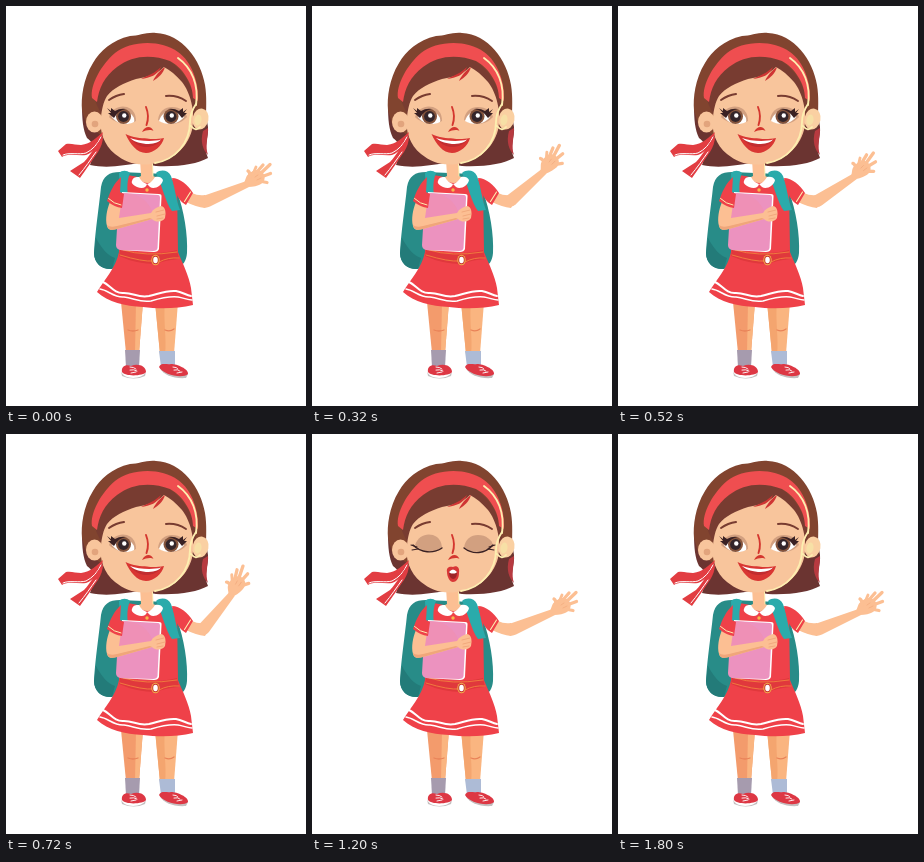
These frames come from a looping animation (300 by 400 pixels, 2000 ms). An HTML page with a canvas:

```html
<!DOCTYPE html>
<html lang="en">
<head>
<meta charset="utf-8">
<title>Waving girl</title>
<style>
html, body { margin: 0; width: 100%; height: 100%; overflow: hidden; background: #fff; }
canvas { display: block; width: 100vw; height: 100vh; }
</style>
</head>
<body>
<canvas id="stage"></canvas>
<script>
const W = 300, H = 400, LOOP = 2000, STEP = 40;
const canvas = document.getElementById('stage');
const ctx = canvas.getContext('2d');

const SKIN = '#f8c59c', LIMB = '#fcbf93', SHADE = '#f0a67a', RED = '#ef4149', DEEP = '#d93633';
const CROWN = '#81442f', HAIR = '#783c31', HAIR_DARK = '#6b3431';
const TEAL = '#2aabab', TEAL_DARK = '#288c88';
const CREAM = '#fdeeb0', WHITE = '#fff', INK = '#3a2123';

function fill(color, d) {
  ctx.fillStyle = color;
  ctx.fill(new Path2D(d));
}

function line(color, width, d) {
  ctx.strokeStyle = color;
  ctx.lineWidth = width;
  ctx.stroke(new Path2D(d));
}

function oval(color, x, y, rx, ry = rx, turn = 0) {
  ctx.fillStyle = color;
  ctx.beginPath();
  ctx.ellipse(x, y, rx, ry, turn, 0, Math.PI * 2);
  ctx.fill();
}

function backpack() {
  fill(TEAL_DARK, 'M114 166C103 166 97 170 95 181C93 201 89 226 88 247C88 258 97 264 106 263L122 256L164 256C172 264 180 260 181 247C182 229 178 204 171 186L160 168Z');
  fill('#237b79', 'M90 232C96 243 101 249 109 252L106 263C97 264 88 258 88 247Z');
}

function legs() {
  fill('#f39b6c', 'M115 296L120 347L133 347L137 296Z');
  fill('#fab580', 'M130 296L137 296L133 347L129 347Z');
  fill('#fab580', 'M149 296L154 348L168 348L172 296Z');
  fill('#f4a56f', 'M149 296L159 296C157 314 161 334 159 348L154 348Z');
  line('#e98358', 1.3, 'M122 324Q127 326 132 324M159 324Q164 326 168 323');
  fill('#a69bae', 'M119 344L134 344L133 361L120 361Z');
  fill('#adbbd6', 'M153 345L169 345L169 361L155 361Z');
  fill('#c4bfc0', 'M115 365C117 374 136 374 140 366L139 370Q128 375 116 370Z');
  fill('#dd3744', 'M116 366C115 360 120 358 125 360C132 357 140 360 140 366C138 370 119 371 116 366Z');
  fill('#c4bfc0', 'M154 362C157 369 168 373 180 372L182 368L155 360Z');
  fill('#dd3744', 'M153 361C155 356 161 359 165 358C171 358 183 363 182 368C177 373 157 369 153 361Z');
  line(WHITE, 0.9, 'M124 361Q128 361 130 363M124 364Q128 363 131 365M125 367L130 366M167 361Q171 361 172 363M168 364Q172 363 174 365M171 367L176 366');
}

function dress() {
  fill(RED, 'M116 170C121 168 128 170 132 171L151 171C158 169 168 170 171 180L172 246C176 256 183 270 185 282L187 299C171 303 152 303 137 301C119 300 102 296 91 286C98 274 110 262 113 246Z');
  line(WHITE, 2, 'M97 276C104 279 108 288 118 287C128 287 132 292 143 290C152 288 160 284 170 285C176 286 180 289 185 290');
  line(WHITE, 1.5, 'M94 283C102 284 108 292 118 291C128 292 134 297 145 295C155 292 163 290 172 291C178 292 182 294 186 294');
  fill('#e0383c', 'M114 243Q140 251 171 244L173 253Q160 254 150 258Q130 258 113 250Z');
  line('#f2803f', 0.9, 'M117 244Q139 251 171 246M114 249Q137 256 147 255M153 256Q162 251 173 252');
  oval('#f1b14d', 149.5, 254, 4.2, 5.3);
  oval('#c9312e', 149.5, 254, 3.2, 4.2);
  oval(WHITE, 149.5, 254, 2.3, 3.2);
}

function strapsAndSleeves() {
  fill(TEAL, 'M113 167C116 164 121 164 124 167C121 174 121 182 122 190L114 190Z');
  fill(TEAL, 'M150 167C155 163 162 164 165 170C169 181 170 194 174 204L166 205C160 198 156 179 150 167Z');
  fill(RED, 'M166 172C174 172 182 179 187 187L180 199C175 196 171 191 170 186Z');
  line(CREAM, 1.1, 'M184.500 186L178.500 195.500');
}

function chest() {
  fill(LIMB, 'M134 153L147 153L147 170L152 172Q142 182 131 172L135 170Z');
  line(CREAM, 1, 'M146.500 158L147 170');
  fill(WHITE, 'M126 175C127 171 130 171 133 171C135 175 138 177 141 178C140 182 136 183 131 181C127 179 125 177 126 175Z');
  fill(WHITE, 'M141 178C145 177 147 174 149 171C152 170 156 171 157 174C156 180 148 184 144 181Z');
  oval('#f6b84d', 141, 184, 1.7);
}

function book() {
  fill(WHITE, 'M116 186L153 188Q156 188 155.500 191L153 243Q152 246 148 246L114 244Z');
  fill('#ec92bf', 'M113 189Q113 187 116 187L152 189Q154 189 154 192L151.500 242Q151 245 147 245L114 244Q110 243 110 239Z');
  fill('#ef90b6', 'M113 189Q113 187 116 187L127 188C138 191 145 199 148 211L112 214Z');
}

function nearArm() {
  fill(LIMB, 'M104 196C101 203 99 213 101 220C102 225 107 224 111 223L146 213C150 217 157 216 159 212C160 207 160 201 155 200C151 201 147 203 145 207L113 212L115 198Z');
  fill(SHADE, 'M101 219C102 225 107 224 111 223L146 213L144 212L111 220Q104 222 101 219Z');
  line(SHADE, 0.9, 'M150 206L158 204M151 210L159 208M151 213L157 212');
  fill(RED, 'M115 171C108 177 104 186 101 195Q108 201 116 202L118 188L114 186Z');
  line(CREAM, 1, 'M102.500 192.500Q108 198 115 199');
}

function wavingArm(turn) {
  fill(LIMB, 'M186 187Q192 190 199 189L203 195L199 202Q190 201 180 196Z');
  ctx.save();
  ctx.translate(197, 200);
  ctx.rotate(turn * Math.PI / 180);
  ctx.translate(-197, -200);
  fill(LIMB, 'M197 190L239 175.500L243 181L204 200.500Q199 203 195 200Z');
  fill(LIMB, 'M238 177C240 173 240 169 243 168C247 164 253 162 257 167C260 171 259 177 253 179C248 181 243 181 240 181Z');
  line(LIMB, 3.3, 'M244 171Q244 166 242 165M250 167L257 159M254 168L264 158.500M255 171L264.500 167.500M253 175L261 176.500');
  line(LIMB, 2.9, 'M247 168L250 161');
  line(SHADE, 0.6, 'M249 171L252 169M251 174L255 172');
  ctx.restore();
}

function hair() {
  fill(HAIR_DARK, 'M76 100C76 113 77 124 81 132C90 138 88 148 84 159C102 163 119 159 133 157L150 160C173 161 191 158 202 152C197 141 203 131 202 121L196 83Z');
  fill('#b73a40', 'M197 125L202 122C202 132 199 140 202 149C197 144 194 136 197 125Z');
  fill(CROWN, 'M150 27C140 26 133 30 124 30C106 34 94 45 87 57C77 73 75 92 76 104L80 118L96 130L102 95L187 95L190 122L200 116C200 102 201 91 199 79C195 54 176 28 150 27Z');
  fill(HAIR, 'M90 97C91 73 112 48 140 48C166 48 188 72 190 104L187 118L100 118Z');
  fill('#ef4e50', 'M86 92C84 79 95 59 109 47C124 35 154 33 172 46C186 56 193 76 192 95L187 92C187 78 177 62 164 55C146 48 126 49 111 61C98 71 93 82 91 96Z');
  line(CREAM, 1.9, 'M172 52C186 62 193 79 190 99');
}

function ears() {
  oval(SKIN, 88.500, 116, 8.5, 10.5);
  oval('#e2a47d', 89, 118, 3.3);
  oval('#fad0a2', 194.500, 113, 8, 10.5, 0.2);
  oval('#f7e0a6', 192, 114, 3.5, 5.5, 0.2);
}

function head() {
  fill(SKIN, 'M158 61C150 69 140 71 130 73C118 77 107 82 101 90C97 97 96 103 95 111C93 125 98 139 109 148C119 156 130 160 144 158C165 156 181 143 186 124C190 106 184 86 176 76C170 69 164 64 158 61Z');
  line(CREAM, 1.9, 'M190 98C186 104 184 110 184 116C184 137 169 154 149 157M185 120Q190 126 194 121');
  fill('#cf3534', 'M155 61C149 67 143 69 135 73C144 72 152 69 155 61Z');
  fill('#cf3534', 'M159 61C154 64 149 70 147 75C152 72 157 68 159 61Z');
  line(HAIR, 2, 'M103 94Q110 89 118 88M160 90Q171 89 180 95');
}

function bow() {
  fill('#e23d42', 'M97 126C91 131 85 138 75 139C70 139 65 137 60 138L52 145L56 151C62 147 72 150 80 149C88 146 95 138 97 126Z');
  line(WHITE, 1, 'M57 149C63 146 73 149 80 147Q90 142 95 131');
  fill('#e23d42', 'M97 130C90 138 85 149 78 156L64 165L74 172C80 164 87 153 92 146C95 141 97 136 97 130Z');
  line(WHITE, 1, 'M73 169C79 162 85 153 90 146');
}

function nose() {
  line('#d4372f', 1.9, 'M140 101C142 106 143 112 140.500 119');
  fill('#d4372f', 'M136 126C139 120 145 119 147.500 125C145 123 140 124 136 126Z');
}

function lids() {
  fill('#d2a080', 'M103 111C106 102 114 99 121 101C127 103 130 108 130 115C120 120 109 117 103 111Z');
  fill('#d2a080', 'M152 114C153 105 159 101 166 101C174 101 180 106 181 111C174 119 162 120 152 114Z');
}

function eyes(closed) {
  lids();
  if (closed) {
    line(INK, 1.4, 'M101 111C109 119 121 120 130 114M152 114C161 121 173 120 181 111');
    line(INK, 1.1, 'M99 111L105 113M100 116L106 115M183 111L177 113M182 116L176 115');
    return;
  }
  fill(WHITE, 'M106 111C110 105 117 104 122 106C127 109 129 112 128 116C120 120 111 118 106 111Z');
  fill(WHITE, 'M153 115C155 108 161 104 167 105C173 106 177 109 178 111C172 119 161 120 153 115Z');
  for (const x of [117.5, 165]) {
    oval('#85543c', x, 110.5, 7.5);
    oval('#33252a', x, 110.5, 5.4);
    oval(WHITE, x + 0.8, 109.5, 2.2);
  }
  fill(INK, 'M101 102L105 105L105 102L109 105Q114 102 120 103Q112 104 108 112L102 107L105 107Z');
  fill(INK, 'M181 103L177 106L177 102L173 105Q168 102 162 103Q171 104 176 112L181 107L178 107Z');
}

function mouth(round) {
  if (round) {
    fill('#d83737', 'M135 138C134 133 138 132 141 133C145 131 148 134 147 139C147 145 144 148 141 148C138 148 135 143 135 138Z');
    fill('#9d2529', 'M137 138Q141 133 145 138Q145 145 141 145Q137 144 137 138Z');
    fill(WHITE, 'M137 138Q141 133 145 138L144 139Q141 140 138 139Z');
    return;
  }
  fill(DEEP, 'M119.500 128C127 132 135 132 141 132.500C147 133.500 152 133 158 132C156 140 148 147 140 147C131 147 124 138 119.500 128Z');
  fill('#c22d30', 'M125 133C133 136 147 136 155 134C150 140 145 141 139 141C132 140 128 137 125 133Z');
  fill(WHITE, 'M124 132C132 135 147 136 155 133.500C152 137 147 138 140 138C132 137 127 135 124 132Z');
}

// Two even swings between rest and 33 degrees
function armTurn(t) {
  const keys = [[0, 0], [222, -33], [445, 0], [682, -33], [920, 0]];
  for (let i = 1; i < keys.length; i++) {
    const [t0, a] = keys[i - 1], [t1, b] = keys[i];
    if (t <= t1) return a + (b - a) * (t - t0) / (t1 - t0);
  }
  return 0;
}

const within = (t, from, to) => t >= from && t < to;

function draw(now) {
  const t = Math.floor((now % LOOP) / STEP) * STEP;
  const ratio = window.devicePixelRatio || 1;
  const w = Math.round(innerWidth * ratio), h = Math.round(innerHeight * ratio);
  if (canvas.width !== w || canvas.height !== h) {
    canvas.width = w;
    canvas.height = h;
  }
  ctx.setTransform(w / W, 0, 0, h / H, 0, 0);
  ctx.lineCap = ctx.lineJoin = 'round';
  ctx.fillStyle = WHITE;
  ctx.fillRect(0, 0, W, H);

  backpack();
  legs();
  wavingArm(armTurn(t));
  dress();
  strapsAndSleeves();
  hair();
  chest();
  book();
  nearArm();
  ears();
  head();
  bow();
  eyes(within(t, 1200, 1280));
  nose();
  mouth(within(t, 1080, 1320) || within(t, 1560, 1800));
}

const start = performance.now();
function tick() {
  draw(performance.now() - start);
  requestAnimationFrame(tick);
}
tick();
</script>
</body>
</html>
```
